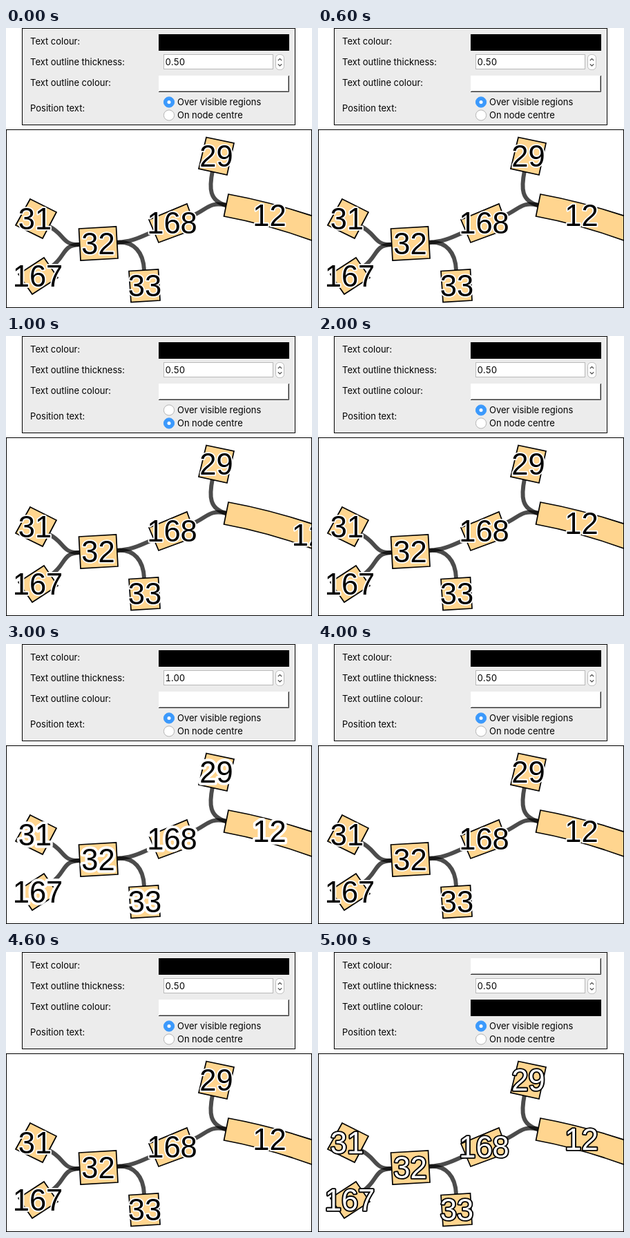
An HTML page that plays this animation: 443 by 406 pixels, repeating every 6000 ms.

```html
<!DOCTYPE html>
<html lang="en">
<head>
<meta charset="utf-8">
<title>Node label settings</title>
<style>
  html, body { margin: 0; width: 100%; height: 100%; overflow: hidden; background: #fff; }
  svg { display: block; width: 100%; height: 100%; }
  .ui { font: 13px Inter, sans-serif; font-variant-numeric: tabular-nums; fill: #000; }
  .edge { fill: none; stroke: #000; stroke-opacity: .7; stroke-width: 6; }
  .node { fill: #ffd58f; stroke: #000; stroke-width: 1.7; }
  .label {
    font: 43.5px "Liberation Sans", Arial, sans-serif;
    text-anchor: middle; paint-order: stroke; stroke-linejoin: round;
  }
  .frame { fill: none; stroke: #000; }
</style>
</head>
<body>
<svg id="stage" viewBox="0 0 443 406">
  <rect width="443" height="406" fill="#fff"/>
  <rect x="23.5" y=".5" width="395" height="140" fill="#ececec" stroke="#000"/>
  <g id="panel"></g>
  <g id="graph"></g>
  <rect class="frame" x=".5" y="147.5" width="442" height="258"/>
</svg>
<script>
const panel = document.getElementById('panel');
const graph = document.getElementById('graph');

function add(parent, tag, attrs, text) {
  const el = document.createElementNS('http://www.w3.org/2000/svg', tag);
  set(el, attrs);
  if (text) el.textContent = text;
  parent.appendChild(el);
  return el;
}
function set(el, attrs) {
  for (const k in attrs) el.setAttribute(k, attrs[k]);
}
const uiText = (x, y, text) => add(panel, 'text', { class: 'ui', x, y }, text);

// Settings panel
uiText(35, 24, 'Text colour:');
uiText(35, 54, 'Text outline thickness:');
uiText(35, 84, 'Text outline colour:');
uiText(35, 121, 'Position text:');

// Raised button: dark outer and grey inner shade at the bottom right
function swatch(y) {
  const face = add(panel, 'rect', { x: 221, y, width: 189, height: 24 });
  const shade = (inset, stroke) => add(panel, 'path', {
    d: `M${221 + inset} ${y + 23.5 - inset}H${409.5 - inset}V${y + inset}`, fill: 'none', stroke
  });
  const inner = shade(1, '#a0a0a0');
  shade(0, '#333');
  return colour => {
    set(face, { fill: colour });
    set(inner, { stroke: colour === '#fff' ? '#a0a0a0' : colour });
    set(inner.nextSibling, { stroke: colour === '#fff' ? '#333' : colour });
  };
}
const textSwatch = swatch(9);
const outlineSwatch = swatch(69);

add(panel, 'rect', { x: 228.5, y: 38.5, width: 158, height: 21, fill: '#fff', stroke: '#b9b9b9' });
const thickness = uiText(230.5, 53.5, '0.50');
add(panel, 'rect', { x: 390.5, y: 38.5, width: 12, height: 22, rx: 5, fill: '#fff', stroke: '#bdbdbd' });
add(panel, 'path', {
  d: 'M393.8 47.2l2.7-2.7 2.7 2.7M393.8 52.3l2.7 2.7 2.7-2.7',
  fill: 'none', stroke: '#444', 'stroke-width': 1.2
});

function radio(y, text) {
  const ring = add(panel, 'circle', { cx: 236, cy: y, r: 7.6 });
  const dot = add(panel, 'circle', { cx: 236, cy: y, r: 2.5, fill: '#fff' });
  uiText(248, y + 4.5, text);
  return on => {
    set(ring, { fill: on ? '#3b99fc' : '#fff', stroke: on ? '#3b99fc' : '#b4b4b4' });
    set(dot, { visibility: on ? 'visible' : 'hidden' });
  };
}
const overRegions = radio(107.5, 'Over visible regions');
const onCentre = radio(126.5, 'On node centre');

// Graph: each edge leaves and enters along the axis of its node
[
  'M63 288C85 299 81 315 106 314',
  'M66 346C87 331 81 315 106 314',
  'M161 311C186 309 191 304 214 295',
  'M161 311C186 309 199 326 200 351',
  'M268 273C292 263 294 251 319 257',
  'M299 207C294 232 294 251 319 257'
].forEach(d => add(graph, 'path', { class: 'edge', d }));

const nodes = [
  ['31', 42, 277, 'M35 248L73 267L53 305L14 286Z'],
  ['167', 46, 360, 'M55 333L75 362L38 386L18 357Z'],
  ['32', 133.5, 312.5, 'M105.5 291L159.5 288L162 334L108 337Z'],
  ['33', 201, 374, 'M178 352.5L220.5 350L223 395L181 397.5Z'],
  ['168', 240.5, 282.5, 'M262 255L275 291L221 311L207 278Z'],
  ['29', 304.5, 186, 'M290 158.5L330 167L320 213L279 204Z'],
  ['12', 381.5, 271.5, 'M322 241Q388 253 460 278V314.5Q386 286 315.5 273Z']
];
nodes.forEach(n => add(graph, 'path', { class: 'node', d: n[3] }));
const baseline = y => y + 15.2;
const labels = nodes.map(([text, x, y]) =>
  add(graph, 'text', { class: 'label', x, y: baseline(y) }, text));
const longLabel = labels[6];
const [, viewX, viewY] = nodes[6];

// One step per second
const base = { ink: '#000', outline: '#fff', width: 0.5, centred: false };
const steps = [{}, { centred: true }, {}, { width: 1 }, {}, { ink: '#fff', outline: '#000' }]
  .map(s => ({ ...base, ...s }));
let shown;

function render(ms) {
  const s = steps[Math.floor(ms / 1000) % steps.length];
  if (s === shown) return;
  shown = s;
  textSwatch(s.ink);
  outlineSwatch(s.outline);
  thickness.textContent = s.width.toFixed(2);
  overRegions(!s.centred);
  onCentre(s.centred);
  labels.forEach(l => set(l, { fill: s.ink, stroke: s.outline, 'stroke-width': s.width * 7.4 }));
  set(longLabel, s.centred
    ? { x: viewX + 56.5, y: baseline(viewY + 17) }
    : { x: viewX, y: baseline(viewY) });
}

const start = performance.now();
function tick() {
  render(performance.now() - start);
  requestAnimationFrame(tick);
}
tick();
</script>
</body>
</html>
```
